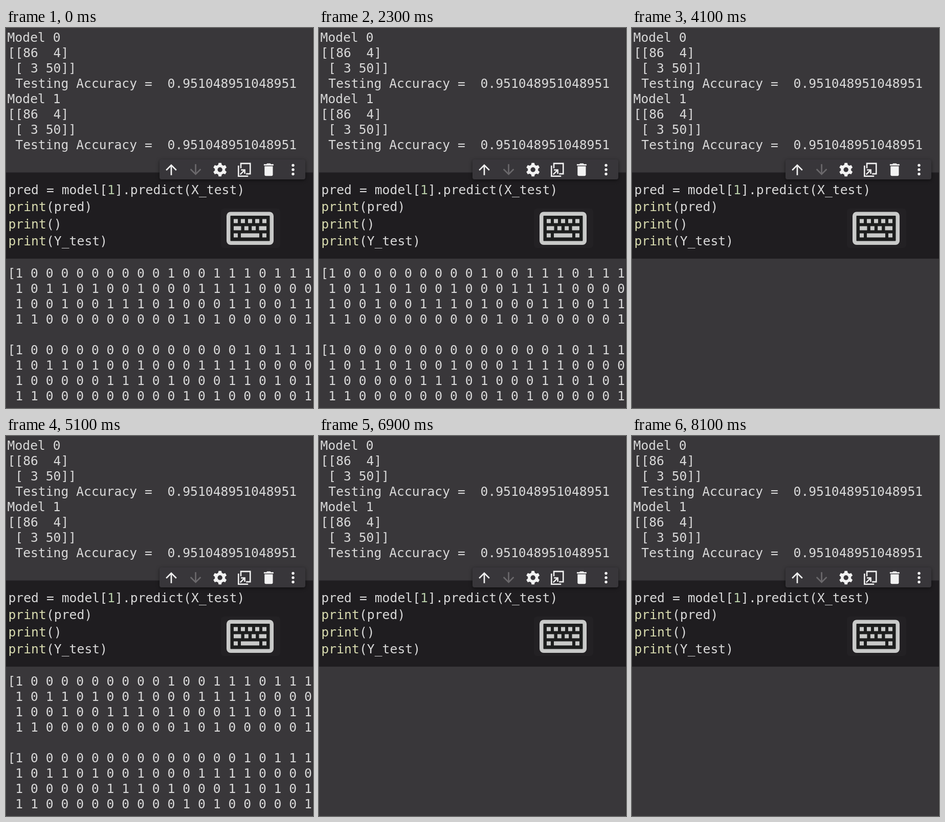
Write an HTML page with a canvas that moves like this. It is 600 px wide and 743 px high and loops after 8500 ms.

```html
<!DOCTYPE html>
<html lang="en">
<head>
<meta charset="utf-8">
<title>Notebook cell</title>
<style>
html, body { margin: 0; width: 100%; height: 100%; overflow: hidden; background: #39373a; }
canvas { display: block; }
</style>
</head>
<body>
<canvas id="stage" width="600" height="743"></canvas>
<script>
const ctx = document.getElementById('stage').getContext('2d');
const LOOP = 8500;
// The output toggles at each time, starting visible.
const TOGGLES = [900, 1500, 2500, 3200, 4100, 5100, 5900, 7400, 8100];
const BG = '#39373a', CELL = '#1f1d20', BAR = '#38363a', ICON = '#f2f2f2';
const TEXT = '#d9d9d9', CALL = '#d9dcb0', NUM = '#b9cfa9';
const ROW = 30, CODE_ROW = 33.4;

// Each row is one 20-bit value; the true labels differ where a guess was wrong.
const PREDICTED = [0x80277, 0xb48f0, 0x93a33, 0xc0141];
const WRONG = [0x260, 0, 0x10006, 0];
const ACTUAL = PREDICTED.map((row, i) => row ^ WRONG[i]);

const MATRIX = ['[[86  4]', ' [ 3 50]]', ' Testing Accuracy =  0.951048951048951'];
const CODE = ['pred = model[1].predict(X_test)', 'print(pred)', 'print()', 'print(Y_test)'];

function setFont(size) {
  ctx.font = size + 'px "DejaVu Sans Mono", monospace';
}

function box(x, y, w, h, r, color) {
  ctx.fillStyle = color;
  ctx.beginPath();
  ctx.roundRect(x, y, w, h, r);
  ctx.fill();
}

function dot(x, y, r, color) {
  ctx.fillStyle = color;
  ctx.beginPath();
  ctx.arc(x, y, r, 0, Math.PI * 2);
  ctx.fill();
}

function line(width, ...points) {
  ctx.lineWidth = width;
  ctx.beginPath();
  points.forEach(([x, y]) => ctx.lineTo(x, y));
  ctx.stroke();
}

// Draws an icon centred in the toolbar on a 24-unit grid.
function icon(x, draw) {
  ctx.save();
  ctx.translate(x, 277);
  ctx.scale(1.35, 1.35);
  ctx.strokeStyle = ICON;
  draw();
  ctx.restore();
}

function arrow(dir, color) {
  ctx.scale(1, dir);
  ctx.strokeStyle = color;
  line(2, [0, 8], [0, -6.6]);
  line(2, [-7.3, 0.7], [0, -6.6], [7.3, 0.7]);
}

function gear() {
  dot(0, 0, 7.5, ICON);
  for (let i = 0; i < 6; i++) {
    ctx.beginPath();
    ctx.moveTo(-2.8, -6);
    ctx.lineTo(-2, -9.9);
    ctx.lineTo(2, -9.9);
    ctx.lineTo(2.8, -6);
    ctx.fill();
    ctx.rotate(Math.PI / 3);
  }
  dot(0, 0, 3.5, BAR);
}

function mirror() {
  line(1.9, [-5, -2], [-5, -9], [8.5, -9], [8.5, 6], [2.5, 6]);
  line(1.9, [-8.5, -6], [-8.5, 9.5], [5.5, 9.5]);
  line(1.9, [-6, 7], [0.5, 0.5]);
  line(1.9, [-5, 0.4], [0.6, 0.4], [0.6, 6]);
}

function trash() {
  box(-6, -5, 12, 14, [0, 0, 2, 2], ICON);
  box(-7, -8, 14, 2, 0, ICON);
  box(-3, -9, 6, 1.5, [1, 1, 0, 0], ICON);
}

function kebab() {
  for (let i = -1; i <= 1; i++) dot(0, i * 6.3, 2, ICON);
}

function toolbar() {
  ctx.save();
  ctx.shadowColor = 'rgba(0,0,0,.5)';
  ctx.shadowBlur = 6;
  ctx.shadowOffsetY = 2;
  box(300, 257, 285, 39, 4, BAR);
  ctx.restore();
  const icons = [() => arrow(1, ICON), () => arrow(-1, '#6b696c'), gear, mirror, trash, kebab];
  icons.forEach((draw, i) => icon(323 + 47.6 * i, draw));
}

// Spreads keys of the given widths evenly over one keyboard row.
function keyRow(widths, y, color) {
  const span = 64;
  const gap = (span - widths.reduce((a, b) => a + b)) / (widths.length - 1);
  let x = 445;
  widths.forEach(w => {
    box(x, y, w, 8, 0, color);
    x += w + gap;
  });
}

function keyboard() {
  const light = '#c9cac9', key = 8, wide = 14.5, space = 36;
  box(420, 353, 116, 77, 6, '#232124');
  box(431, 359.5, 92, 64.5, 8, light);
  box(438.5, 367, 77, 49.5, 1, '#1d1e1e');
  keyRow(Array(5).fill(key), 373.5, light);
  keyRow([wide, key, key, wide], 387.5, light);
  keyRow([key, space, key], 401.5, light);
}

function report() {
  ctx.fillStyle = TEXT;
  for (let model = 0; model < 2; model++) {
    const y = 27 + model * 4 * ROW;
    ctx.fillText('Model ' + model, 2.6, y);
    MATRIX.forEach((text, i) => ctx.fillText(text, 3.4, y + ROW * (i + 1)));
  }
}

function code() {
  CODE.forEach((text, i) => {
    let x = 4.4;
    text.split(/(print|\d)/).forEach(part => {
      ctx.fillStyle = part === 'print' ? CALL : /^\d$/.test(part) ? NUM : TEXT;
      ctx.fillText(part, x, Math.round(325 + CODE_ROW * i));
      x += ctx.measureText(part).width;
    });
  });
}

function output(rows, top) {
  ctx.fillStyle = TEXT;
  rows.forEach((row, i) => {
    const bits = [...row.toString(2)].join(' ');
    ctx.fillText((i ? ' ' : '[') + bits, 3.4, top + ROW * i);
  });
}

function frame(now) {
  const t = now % LOOP;
  const visible = TOGGLES.filter(s => s <= t).length % 2 === 0;
  box(0, 0, 600, 743, 0, BG);
  box(0, 282.5, 600, 168.5, 0, CELL);
  setFont(24.7);
  report();
  if (visible) {
    output(PREDICTED, 488);
    output(ACTUAL, 488 + 5 * ROW);
  }
  setFont(24.75);
  code();
  toolbar();
  keyboard();
  box(599, 0, 1, 743, 0, 'rgba(0,0,0,.2)');
  requestAnimationFrame(frame);
}

requestAnimationFrame(frame);
</script>
</body>
</html>
```
